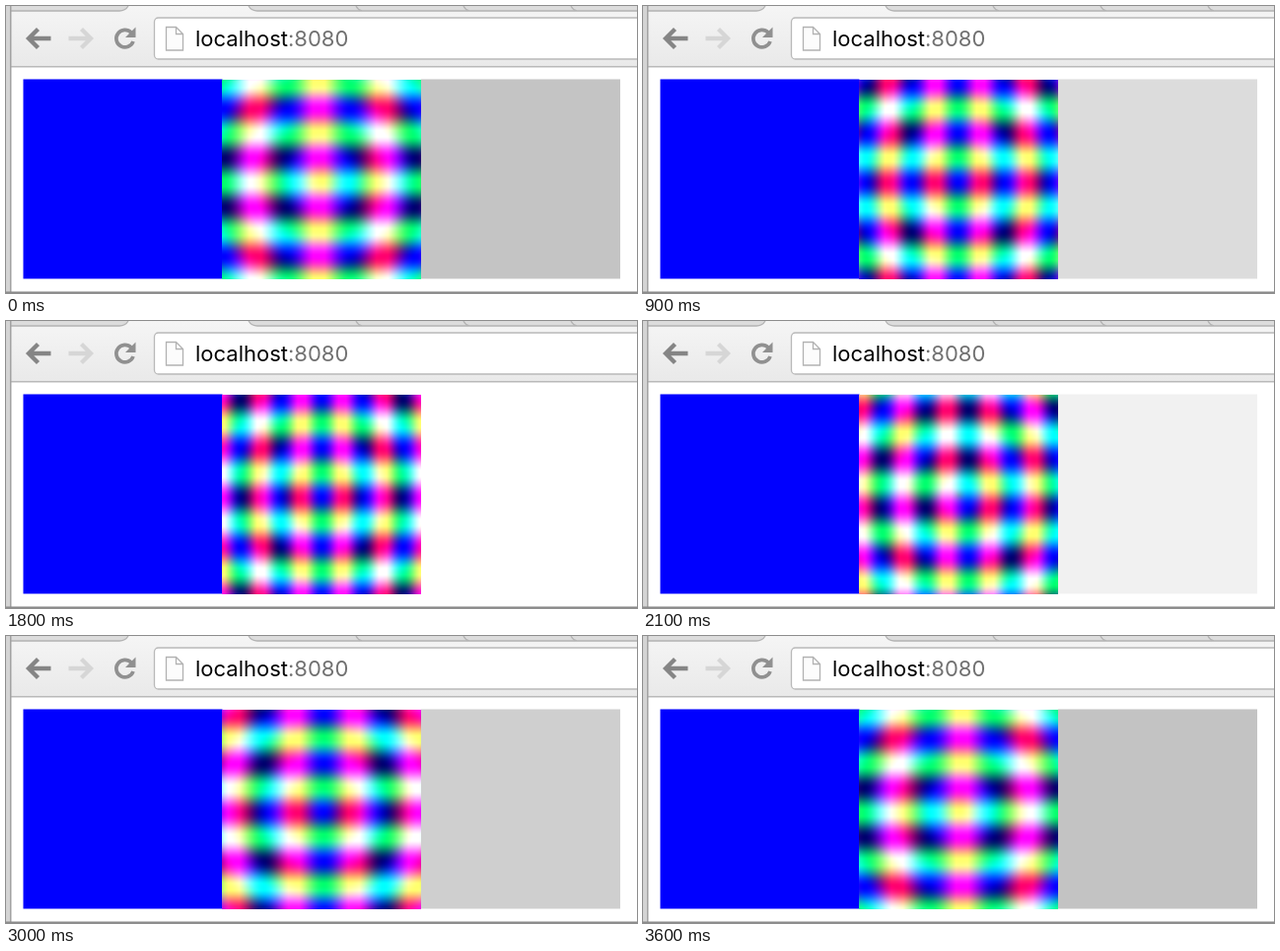
An HTML page with a canvas for the animation above (3.7 s loop, 640 px wide and 292 px high).

```html
<!DOCTYPE html>
<html lang="en">
<head>
<meta charset="utf-8">
<title>Shader panels</title>
<style>
  html, body { margin: 0; width: 100%; height: 100%; overflow: hidden; background: #fff; }
  #stage { position: relative; width: 640px; height: 292px; overflow: hidden; }
  svg, canvas { position: absolute; left: 0; top: 0; }
  #waves { left: 219px; top: 75px; }
  text { font: 22px Inter, "Open Sans", sans-serif; }
</style>
</head>
<body>
<div id="stage">
  <svg width="640" height="292" viewBox="0 0 640 292">
    <defs>
      <linearGradient id="bar" x2="0" y2="1">
        <stop stop-color="#f5f5f5"/><stop offset="1" stop-color="#e9e9e9"/>
      </linearGradient>
    </defs>
    <path fill="#fff" d="M0 0h640v292H0z"/>
    <path fill="url(#bar)" d="M5 0h635v62H5z"/>
    <path fill="#dcdcdc" d="M5 0H124Q121 5 115 5H5zM246 0H640V5H255Q249 5 246 0z"/>
    <path fill="none" stroke="#b4b4b4" stroke-width="1.3" d="M5 5H115Q121 5 124 0M246 0Q249 5 255 5H640M355 0q2 4 6 5M464 0q2 4 6 5M573 0q2 4 6 5"/>
    <path fill="#b9b9b9" d="M5 61h635v1.500H5z"/>
    <path fill="#d4d4d4" d="M0 0h4v292H0z"/>
    <path fill="#a2a2a2" d="M4 0h1.500v292H4z"/>
    <path fill="#8c8c8c" d="M0 290.500h640V292H0z"/>
    <rect x="150.500" y="12" width="500" height="42" rx="4" fill="#fff" stroke="#b9b9b9" stroke-width="1.300"/>
    <g transform="translate(-.5 -.5)">
      <g fill="none" stroke-width="4.300">
        <path stroke="#858585" d="M46 33.500H24M33 24l-9.500 9.500 9.500 9.500"/>
        <path stroke="#d6d6d6" d="M64 33.500H86M77 24l9.500 9.500-9.500 9.500"/>
        <path stroke="#909090" stroke-width="3.700" d="M127.500 27.500A8.800 8.800 0 1 0 129.500 36.500"/>
      </g>
      <path fill="#909090" d="M132 22v10.500h-10.500z"/>
    </g>
    <path fill="#fcfcfc" stroke="#b2b2b2" stroke-width="1.300" d="M162.500 21.500h10l7 7v16.500h-17zM172.500 21.500v7h7"/>
    <text x="192" y="41" fill="#050505">localhost<tspan fill="#717171">:8080</tspan></text>
    <rect x="17.500" y="74.500" width="202" height="203" fill="#00f"/>
    <rect id="grey" x="421" y="74.500" width="202" height="203"/>
  </svg>
  <canvas id="waves" width="202" height="203"></canvas>
</div>
<script>
  const LOOP = 3700, STEP = 100, W = 202, H = 203, TAU = Math.PI * 2;
  const RING = 50;

  // moments when the middle is brightest and darkest in turn
  const beats = [0, 900, 1300, 1800, 2500, 3000, 3600, 4200];

  const ctx = document.getElementById("waves").getContext("2d");
  const grey = document.getElementById("grey");
  const image = ctx.createImageData(W, H);
  const wave = (turns, mid, amp) => 255 * (mid + amp * Math.cos(TAU * turns));

  function turnsAt(t) {
    const i = beats.findIndex(b => b > t) - 1;
    return (i + (t - beats[i]) / (beats[i + 1] - beats[i])) / 2;
  }

  function drawWaves(t) {
    const turns = turnsAt(t);
    const columns = 4 + 0.95 * Math.cos(TAU * (t - 1600) / LOOP);
    const drift = 0.1 * (t / LOOP - 0.5);
    let i = 0;
    for (let row = 0; row < H; row++) {
      const y = row - H / 2;
      const green = wave(y / RING - turns - 0.06, 0.52, 0.52);
      for (let col = 0; col < W; col++) {
        const x = col - W / 2;
        image.data[i++] = wave(x * columns / W - turns - drift, 0.54, 0.54);
        image.data[i++] = green;
        image.data[i++] = wave(Math.hypot(x, y) / RING - turns - 0.5, 0.73, 0.3);
        image.data[i++] = 255;
      }
    }
    ctx.putImageData(image, 0, 0);
  }

  function drawGrey(t) {
    const rise = Math.max(0, 1 - Math.abs(t - 1750) / 1850);
    const c = Math.min(255, Math.round(195 + 62 * rise ** 1.45));
    grey.setAttribute("fill", `rgb(${c},${c},${c})`);
  }

  const start = performance.now();
  let shown = -1;
  function tick() {
    const t = (performance.now() - start) % LOOP;
    const step = Math.floor(t / STEP) * STEP;
    if (step !== shown) {
      shown = step;
      drawWaves(step);
      drawGrey(step);
    }
    requestAnimationFrame(tick);
  }
  tick();
</script>
</body>
</html>
```
